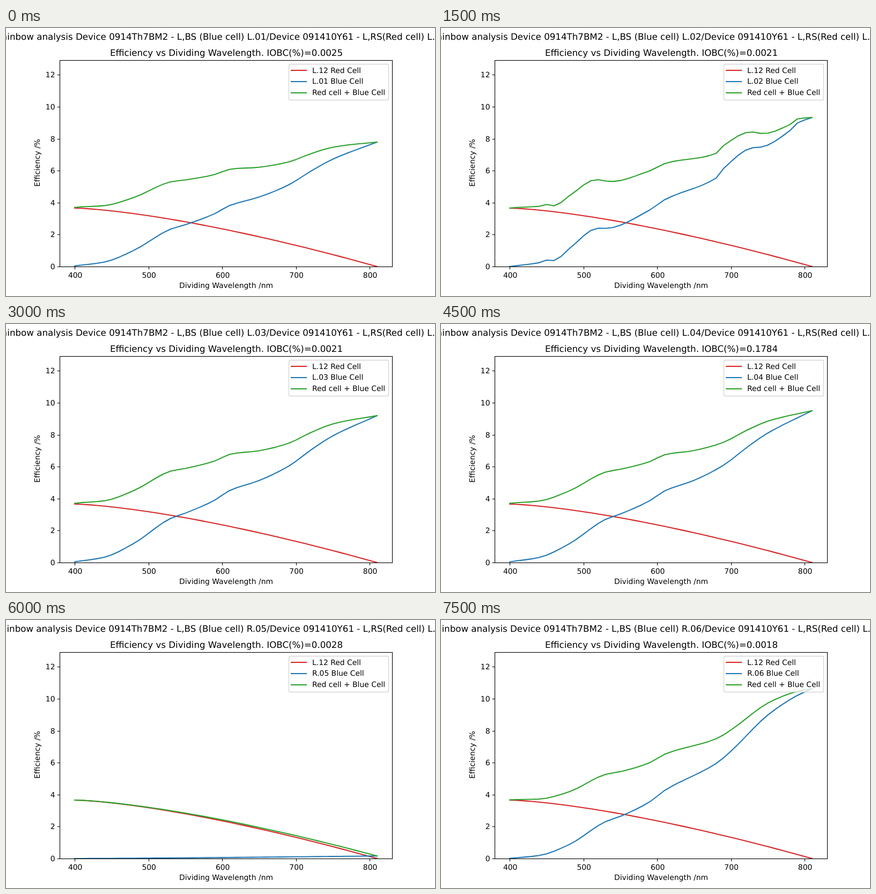
An HTML page for the animation above (8000 ms loop, 800x500 px).

```html
<!DOCTYPE html>
<html lang="en">
<head>
<meta charset="utf-8">
<title>Efficiency vs Dividing Wavelength</title>
<style>
  html, body { margin: 0; width: 100%; height: 100%; overflow: hidden; background: #fff; }
  svg { display: block; }
  text { font: 13.89px "DejaVu Sans", sans-serif; text-rendering: geometricPrecision; }
  .title { font-size: 16.67px; }
  .middle { text-anchor: middle; }
  .end { text-anchor: end; }
  .axis { fill: none; stroke: #000; stroke-width: 1.11; }
  .curve { fill: none; stroke-width: 2.083; stroke-linecap: square; stroke-linejoin: round; }
  .legend { fill: #fff; fill-opacity: .8; stroke: #ccc; stroke-opacity: .8; stroke-width: 1.39; }
</style>
</head>
<body>
<svg id="chart" width="800" height="500" viewBox="0 0 800 500">
  <clipPath id="plot"><rect x="100" y="60" width="620" height="385"/></clipPath>
</svg>
<script>
const LOOP_MS = 8000, SCENE_MS = 1500;
const COLORS = { red: '#d62728', blue: '#1f77b4', green: '#2ca02c' };
const FIRST_NM = 400, LAST_NM = 810, STEP_NM = 10;

const progress = nm => (nm - FIRST_NM) / (LAST_NM - FIRST_NM);
const toX = nm => 128.18 + progress(nm) * 563.64;
const toY = percent => 445 - percent * 29.8;

// Monotone cubic curve through [wavelength, efficiency] points.
function smooth(points) {
  const slopes = points.slice(1).map(([x, y], i) => (y - points[i][1]) / (x - points[i][0]));
  const tangents = points.map((_, i) => {
    const before = slopes[i - 1] ?? slopes[i], after = slopes[i] ?? before;
    return before * after > 0 ? 2 * before * after / (before + after) : 0;
  });
  return nm => {
    const i = Math.max(1, points.findIndex(([x]) => x >= nm));
    const [x0, y0] = points[i - 1], [x1, y1] = points[i];
    const width = x1 - x0, t = (nm - x0) / width, u = 1 - t;
    return y0 * u * u * (1 + 2 * t) + y1 * t * t * (3 - 2 * t)
      + width * t * u * (tangents[i - 1] * u - tangents[i] * t);
  };
}

// Efficiency in % as a function of the dividing wavelength.
const red = nm => 3.66 * (1 - progress(nm) ** 1.44);
const blueL01 = smooth([[400, .04], [440, .28], [480, 1.01], [530, 2.34], [550, 2.62], [590, 3.31],
  [610, 3.82], [650, 4.35], [690, 5.11], [720, 5.96], [750, 6.72], [810, 7.79]]);
const blueL02 = smooth([[400, 0], [440, .24], [450, .4], [460, .37], [480, 1.09], [520, 2.4],
  [530, 2.39], [590, 3.54], [610, 4.18], [680, 5.54], [690, 6.13], [730, 7.44], [740, 7.47],
  [780, 8.51], [790, 8.98], [810, 9.33]]);
const blueL03 = nm => blueL01(nm) * 1.18;
const blueL04 = nm => blueL01(nm) * (1.125 + .095 * progress(nm));
const blueR05 = nm => .16 * progress(nm) ** 1.3;
const blueR06 = smooth([[400, .01], [440, .19], [480, .86], [530, 2.31], [550, 2.64], [590, 3.55],
  [610, 4.26], [680, 5.95], [700, 6.72], [750, 8.98], [790, 10.21], [810, 10.63]]);

const scenes = [
  { cell: 'L.01', iobc: '0.0025', blue: blueL01 },
  { cell: 'L.02', iobc: '0.0021', blue: blueL02 },
  { cell: 'L.03', iobc: '0.0021', blue: blueL03 },
  { cell: 'L.04', iobc: '0.1784', blue: blueL04 },
  { cell: 'R.05', iobc: '0.0028', blue: blueR05 },
  { cell: 'R.06', iobc: '0.0018', blue: blueR06 },
];

const chart = document.getElementById('chart');

function add(tag, attributes, content = '') {
  const node = document.createElementNS('http://www.w3.org/2000/svg', tag);
  for (const name in attributes) node.setAttribute(name, attributes[name]);
  node.textContent = content;
  return chart.appendChild(node);
}
const addText = (x, y, kind, content) => add('text', { x, y, class: kind }, content);
const addCurve = color => add('path', { class: 'curve', stroke: color, 'clip-path': 'url(#plot)' });

function plot(curve, efficiency) {
  const points = [];
  for (let nm = FIRST_NM; nm <= LAST_NM; nm += STEP_NM) {
    points.push(`${toX(nm).toFixed(2)} ${toY(efficiency(nm)).toFixed(2)}`);
  }
  curve.setAttribute('d', 'M' + points.join('L'));
}

const [redCurve, blueCurve, greenCurve] = Object.values(COLORS).map(addCurve);
plot(redCurve, red);

add('rect', { x: 100.5, y: 60.5, width: 620, height: 385, class: 'axis' });
for (let nm = 400; nm <= 800; nm += 100) {
  add('path', { d: `M${Math.round(toX(nm)) + .5} 445.5v4.86`, class: 'axis' });
  addText(toX(nm) + 1, 466, 'middle', nm);
}
for (let percent = 0; percent <= 12; percent += 2) {
  const y = Math.round(toY(percent));
  add('path', { d: `M100.5 ${y + .5}h-4.86`, class: 'axis' });
  addText(91.5, y + 5, 'end', percent);
}
addText(410.5, 485, 'middle', 'Dividing Wavelength /nm');
addText(0, 0, 'middle', 'Efficiency /%').setAttribute('transform', 'translate(63 251.5) rotate(-90)');
const heading = addText(401, 22, 'title middle');
const subtitle = addText(411, 52, 'title middle');

add('rect', { x: 527.5, y: 67.5, width: 186, height: 67, rx: 2.78, class: 'legend' });
const [redLabel, blueLabel, sumLabel] = Object.values(COLORS).map((color, i) => {
  add('path', { d: `M532 ${79 + 21 * i}h28`, class: 'curve', stroke: color });
  return addText(571, Math.round(84 + 20.4 * i), '');
});
redLabel.textContent = 'L.12 Red Cell';
sumLabel.textContent = 'Red cell + Blue Cell';

let shown;
function show(scene) {
  if (scene === shown) return;
  shown = scene;
  const { cell, iobc, blue } = scene;
  plot(blueCurve, blue);
  plot(greenCurve, nm => red(nm) + blue(nm));
  blueLabel.textContent = `${cell} Blue Cell`;
  subtitle.textContent = `Efficiency vs Dividing Wavelength. IOBC(%)=${iobc}`;
  heading.textContent =
    `Rainbow analysis Device 0914Th7BM2 - L,BS (Blue cell) ${cell}/Device 091410Y61 - L,RS(Red cell) L.12`;
}

const start = performance.now();
function tick() {
  show(scenes[Math.floor((performance.now() - start) % LOOP_MS / SCENE_MS)]);
  requestAnimationFrame(tick);
}
tick();
</script>
</body>
</html>
```
